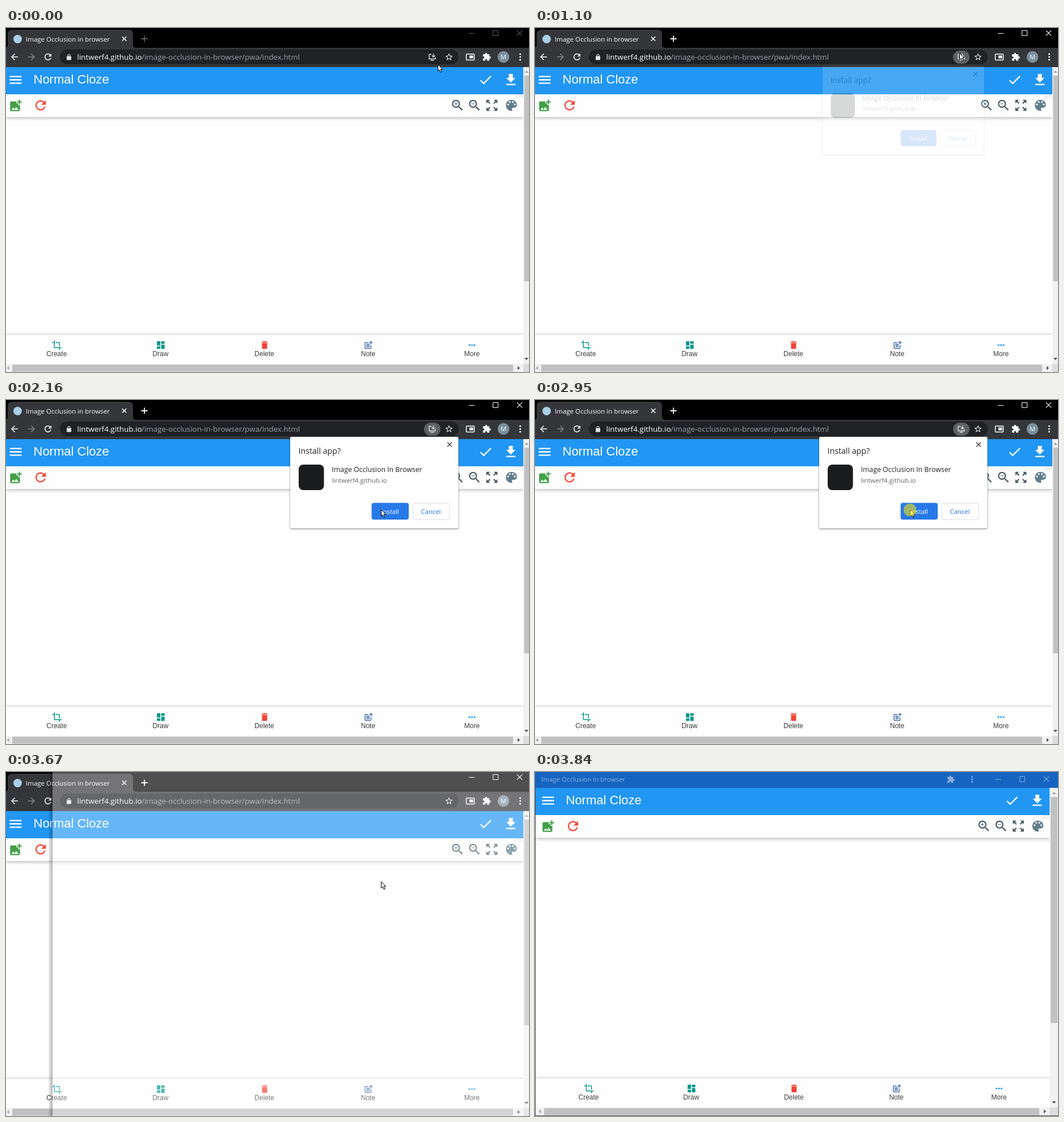
An HTML page for the animation above (4.51 s loop, 922 by 607 pixels).

```html
<!DOCTYPE html>
<html lang="en">
<head>
<meta charset="utf-8">
<title>Installing a web app</title>
<style>
  html, body { margin: 0; width: 100%; height: 100%; overflow: hidden; background: #000; }
  svg { display: block; width: 100vw; height: 100vh; }
  text { font-family: "Open Sans", "Noto Sans CJK SC", "Noto Sans CJK", sans-serif; white-space: pre; }
  .arial { font-family: "Liberation Sans", Arial, sans-serif; }
  .mid { text-anchor: middle; }
  .below { filter: drop-shadow(0 2px 3px #0004); }
  .above { filter: drop-shadow(0 -1px 2px #0003); }
  .card { filter: drop-shadow(0 1px 1.5px #0008); }
</style>
</head>
<body>
<svg id="stage" viewBox="0 0 922 607"></svg>
<script>
const LOOP = 4510;
const BLUE = '#2196f3', CHROME = '#35363a', SLATE = '#455a64', GREY = '#9aa0a6';
const HOST = 'lintwerf4.github.io';

// Icon outlines on a 24 unit grid
const lens = 'M15.5 14h-.79l-.28-.27C15.41 12.59 16 11.11 16 9.5 16 5.91 13.09 3 9.5 3S3 5.91 3 9.5 5.91 16 9.5 16c1.61 0 3.09-.59 4.23-1.57l.27.28v.79l5 4.99L20.49 19zm-6 0C7.01 14 5 11.99 5 9.5S7.01 5 9.5 5 14 7.01 14 9.5 11.99 14 9.5 14z';
const ICONS = {
  menu: 'M3 18h18v-2H3zm0-5h18v-2H3zm0-7v2h18V6z',
  check: 'M9 16.17L4.83 12l-1.42 1.41L9 19 21 7l-1.41-1.41z',
  download: 'M19 9h-4V3H9v6H5l7 7zM5 18v2h14v-2z',
  addImage: 'M19 7v3h-2V7h-3V5h3V2h2v3h3v2zm-3 4V8h-3V5H5c-1.1 0-2 .9-2 2v12c0 1.1.9 2 2 2h12c1.1 0 2-.9 2-2v-8zM5 19l3-4 2 3 3-4 4 5z',
  refresh: 'M17.65 6.35C16.2 4.9 14.21 4 12 4c-4.42 0-7.99 3.58-7.99 8s3.57 8 7.99 8c3.73 0 6.84-2.55 7.73-6h-2.08c-.82 2.33-3.04 4-5.65 4-3.31 0-6-2.69-6-6s2.69-6 6-6c1.66 0 3.14.69 4.22 1.78L13 11h7V4z',
  zoomIn: lens + 'M12 10h-2v2H9v-2H7V9h2V7h1v2h2z',
  zoomOut: lens + 'M7 9h5v1H7z',
  expand: 'M15 3l2.3 2.3-2.89 2.87 1.42 1.42L18.7 6.7 21 9V3zM3 9l2.3-2.3 2.87 2.89 1.42-1.42L6.7 5.3 9 3H3zM9 21l-2.3-2.3 2.89-2.87-1.42-1.42L5.3 17.3 3 15v6zM21 15l-2.3 2.3-2.87-2.89-1.42 1.42 2.89 2.87L15 21h6z',
  palette: 'M12 3c-4.97 0-9 4.03-9 9s4.03 9 9 9c.83 0 1.5-.67 1.5-1.5 0-.39-.15-.74-.39-1.01-.23-.26-.38-.61-.38-.99 0-.83.67-1.5 1.5-1.5H16c2.76 0 5-2.24 5-5 0-4.42-4.03-8-9-8zm-5.5 9a1.5 1.5 0 1 1 0-3 1.5 1.5 0 0 1 0 3zm3-4a1.5 1.5 0 1 1 0-3 1.5 1.5 0 0 1 0 3zm5 0a1.5 1.5 0 1 1 0-3 1.5 1.5 0 0 1 0 3zm3 4a1.5 1.5 0 1 1 0-3 1.5 1.5 0 0 1 0 3z',
  crop: 'M17 15h2V7c0-1.1-.9-2-2-2H9v2h8zM7 17V1H5v4H1v2h4v10c0 1.1.9 2 2 2h10v4h2v-4h4v-2z',
  dashboard: 'M3 13h8V3H3zm0 8h8v-6H3zm10 0h8V11h-8zm0-18v6h8V3z',
  trash: 'M6 19c0 1.1.9 2 2 2h8c1.1 0 2-.9 2-2V7H6zM19 4h-3.5l-1-1h-5l-1 1H5v2h14z',
  note: 'M17 19H5V7h7V5H5c-1.1 0-2 .9-2 2v12c0 1.1.9 2 2 2h12c1.1 0 2-.9 2-2v-7h-2zM19 2h-2v3h-3v2h3v3h2V7h3V5h-3zM7 9h8v2H7zm0 3h8v2H7zm0 3h8v2H7z',
  puzzle: 'M20.5 11H19V7c0-1.1-.9-2-2-2h-4V3.5a2.5 2.5 0 0 0-5 0V5H4c-1.1 0-2 .9-2 2v3.8h1.5a2.7 2.7 0 0 1 0 5.4H2V20c0 1.1.9 2 2 2h3.8v-1.5a2.7 2.7 0 0 1 5.4 0V22H17c1.1 0 2-.9 2-2v-4h1.5a2.5 2.5 0 0 0 0-5z',
  star: 'M22 9.24l-7.19-.62L12 2 9.19 8.63 2 9.24l5.46 4.73L5.82 21 12 17.27 18.18 21l-1.63-7.03zM12 15.4l-3.76 2.27 1-4.28-3.32-2.88 4.38-.38L12 6.1l1.71 4.04 4.38.38-3.32 2.88 1 4.28z',
  lock: 'M18 8h-1V6A5 5 0 0 0 7 6v2H6c-1.1 0-2 .9-2 2v10c0 1.1.9 2 2 2h12c1.1 0 2-.9 2-2V10c0-1.1-.9-2-2-2zm-3 0H9V6a3 3 0 0 1 6 0z',
  back: 'M20 11H7.83l5.59-5.59L12 4l-8 8 8 8 1.41-1.41L7.83 13H20z',
  forward: 'M12 4l-1.41 1.41L16.17 11H4v2h12.17l-5.58 5.59L12 20l8-8z'
};

const rect = (x, y, w, h, fill, extra = '') =>
  `<rect x="${x}" y="${y}" width="${w}" height="${h}" fill="${fill}" ${extra}/>`;
const circle = (x, y, r, fill) => `<circle cx="${x}" cy="${y}" r="${r}" fill="${fill}"/>`;
const text = (x, y, size, fill, str, cls = '') =>
  `<text x="${x}" y="${y}" font-size="${size}" fill="${fill}" class="${cls}">${str}</text>`;
const line = (d, color, width = 1) =>
  `<path d="${d}" fill="none" stroke="${color}" stroke-width="${width}"/>`;
const icon = (name, x, y, size, fill) =>
  `<path d="${ICONS[name]}" fill="${fill}" transform="translate(${x - size / 2} ${y - size / 2}) scale(${size / 24})"/>`;
const dots = (x, y, dx, dy, r, fill) =>
  [-1, 0, 1].map(i => circle(x + i * dx, y + i * dy, r, fill)).join('');
const cross = (x, y, r, color, width) =>
  line(`M${x - r} ${y - r}l${2 * r} ${2 * r}m0 ${-2 * r}l${-2 * r} ${2 * r}`, color, width);
const group = (id, content, extra = '') => `<g id="${id}" ${extra}>${content}</g>`;
const arrow = (x, y, turn, fill) =>
  `<path d="M-3.5 2L0 -2 3.5 2z" fill="${fill}" transform="translate(${x} ${y}) rotate(${turn})"/>`;
const edge = x => rect(x - 8, 0, 8, 607, 'url(#edge)');

const windowButtons = (x, y, color) =>
  line(`M${x - 5} ${y + .5}h10M${x + 37.5} ${y - 4.5}h9v9h-9z`, color) + cross(x + 84.5, y, 4.7, color, 1.1);

// left / right: shift of the icons tied to either side
function app({ x0, x1, y, left, right, footer, labels }) {
  const w = x1 - x0, bar = y + 22.5, tools = y + 67.5;
  const tabs = [['Create', 'crop', '#009688'], ['Draw', 'dashboard', '#009688'],
    ['Delete', 'trash', '#f44336'], ['Note', 'note', '#4a6fa5'], ['More', '', BLUE]];
  return rect(x0, y, w, 607 - y, '#fefefe') +
    rect(x0, y + 48, w, 40, '#fefefe', 'class="below"') + rect(x0, y, w, 48, BLUE) +
    rect(x1 - 14, y + 48, 14, 7, '#f1f1f1') +
    icon('menu', left + 17, bar, 28, '#fff') +
    text(left + 48.5, y + 29.3, 22, '#fff', 'Normal Cloze', 'arial') +
    icon('check', right + 845.5, bar, 27, '#fff') + icon('download', right + 890, bar, 28, '#fff') +
    icon('addImage', left + 17, tools + .5, 26, '#43a047') + icon('refresh', left + 61, tools, 27, '#f44336') +
    icon('zoomIn', right + 796, tools, 26, SLATE) + icon('zoomOut', right + 826, tools, 26, SLATE) +
    icon('expand', right + 856.5, tools, 26, SLATE) + icon('palette', right + 891, tools, 26, '#607d8b') +
    (footer ? rect(x0, footer, w, 52, '#fefefe', 'class="above"') + tabs.map(([name, glyph, color], i) => {
      const x = labels[0] + (labels[1] - labels[0]) * i / 4;
      return (glyph ? icon(glyph, x + .5, footer + 18, 18, color) : dots(x, footer + 18, 4.5, 0, 1.6, color)) +
        text(x, footer + 37.5, 12, '#3c3c3c', name, 'arial mid');
    }).join('') : '');
}

function scrollbars(x, y, top, thumb, bottom, hThumb) {
  const cx = Math.min(x + 7.5, 917.5);
  return rect(x, y, 15, 607 - y, '#f1f1f1') + rect(x + 1.5, thumb[0], 12, thumb[1] - thumb[0], '#c1c1c1') +
    rect(0, bottom, x, 15, '#f1f1f1') + rect(x, bottom, 15, 15, '#dcdcdc') +
    rect(hThumb[0], bottom + 1, hThumb[1] - hThumb[0], 12.5, '#c1c1c1') +
    arrow(cx, top, 0, '#a3a3a3') + arrow(cx, bottom - 9, 180, '#505050') +
    arrow(hThumb[0] - 7.5, bottom + 7, -90, '#a3a3a3') + arrow(hThumb[1] + 10, bottom + 7, 90, '#505050');
}

const frame = (tabX, title, titleX) =>
  rect(0, 0, 922, 607, '#000') + rect(0, 35, 922, 34, CHROME) +
  `<path d="M${tabX - 6} 35q6 0 6-6V11q0-8 8-8H216q8 0 8 8v18q0 6 6 6z" fill="${CHROME}"/>` +
  text(titleX, 24, 11.5, '#fff', title) + cross(208.5, 19, 3.7, '#fff', 1.5) +
  rect(95, 38, 703, 26, '#202124', 'rx="13"') +
  icon('star', 781, 51, 16, '#e8eaed') +
  rect(811.5, 46, 14, 10.5, 'none', 'stroke="#fff" stroke-width="1.5" rx="1"') + rect(817, 48.5, 6.5, 5, '#fff') +
  icon('puzzle', 847.5, 51, 16, '#fff') +
  circle(877, 51, 10.3, '#78909c') + text(877, 55, 11, '#fff', 'M', 'mid') +
  dots(906.5, 51, 0, 5, 1.5, '#fff');
const plus = line('M238.5 19h11M244 13.5v11', '#fff', 1.8);

const browser = frame(3, 'Image Occlusion in browser', 35) + circle(20.5, 19.5, 7.5, '#a9cfe8') +
  icon('back', 15, 51, 18, '#fff') + icon('forward', 45, 51, 18, '#85878a') + icon('refresh', 74, 51, 18, '#fff') +
  icon('lock', 111, 51.5, 12, '#dfe1e5') + text(125.5, 56, 13.4, '#fff', HOST) +
  text(239, 56, 13.4, GREY, '/image-occlusion-in-browser/pwa/index.html') +
  group('install', rect(737, 40, 29, 23, '#5f6063', 'rx="11.5" id="pill"') +
    line('M750 46.5h-4v8h11v-3M748.5 57h6M753.5 45v6M750.8 48.5l2.7 2.7 2.7-2.7', '#dfe1e5', 1.4)) +
  group('controls', plus + windowButtons(821, 9, '#fff')) +
  app({ x0: 0, x1: 912, y: 69, left: 0, right: 0, footer: 541.5, labels: [89.3, 821.5] }) +
  scrollbars(912, 69, 77, [84, 447], 593, [11, 894]);

const dialog = rect(501, 65, 296.5, 161.5, '#fff', 'rx="2" class="card"') +
  cross(782, 78.5, 4, '#444', 1.5) + text(515.5, 95, 14.2, '#202124', 'Install app?') +
  rect(516, 114, 44.5, 45, '#1b1c1e', 'rx="8"') +
  text(574.5, 127, 12.3, '#202124', 'Image Occlusion In Browser') + text(574.5, 145.5, 11.4, '#5f6368', HOST) +
  rect(644.5, 181.5, 65.5, 29.5, '#1a73e8', 'rx="4" id="confirm"') + text(677, 201, 11.3, '#fff', 'Install', 'mid') +
  rect(717, 182, 65, 29, '#fff', 'rx="4" stroke="#dadce0"') + text(749, 201, 11.3, '#1a73e8', 'Cancel', 'mid');

const FOLDER = '#f8dc8c';
const bookmarks = [[94, 'Telmi', '#fff', 1], [163, 'Vuzmelo', '#e53935'], [248, 'Ways', '#5fae6b', 1],
  [314, 'News', '#5b93e8'], [380, 'Watch Later', FOLDER], [481, 'Learn', FOLDER], [547, 'Tools', FOLDER],
  [613, '砾溪学园VOMD(课...', '#4d9fd0'], [754.5, '岚溪院温砚禾的个...', '#35a9e0']];
const appsGrid = ['#ea5b4f', '#f2a93b', '#58a55c'].map((color, row) =>
  [0, 1, 2].map(col => rect(10 + col * 4.5, 76 + row * 4.5, 3, 3, color)).join('')).join('');

const newTab = frame(9, 'New Tab', 20) + plus + windowButtons(821, 9, '#666') +
  rect(0, 69, 922, 28, CHROME) + rect(0, 97, 922, 510, '#323232') + rect(0, 97, 922, 1, '#242527') +
  icon('back', 15, 51, 18, '#a5a7aa') + icon('forward', 45, 51, 18, '#a5a7aa') + cross(74, 51, 4.8, '#fff', 1.8) +
  circle(111.5, 51.5, 7.5, '#fff') + text(125.5, 56, 13.4, GREY, 'Search Plinor or type a URL') +
  appsGrid + text(30, 86, 11.5, '#fff', 'Apps') +
  bookmarks.map(([x, name, color, round]) =>
    (round ? circle(x - 14, 81.5, 7, color) : rect(x - 20, 75.5, 12, 12, color, 'rx="1"')) +
    text(x, 86, 11.5, '#fff', name)).join('') + text(902, 85, 12, '#fff', '»') +
  edge(74) + `<g opacity=".67">${app({ x0: 74, x1: 936, y: -7, left: 78.5, right: 92.5 })}</g>`;

const FADED = '#8aaede';
const installed = rect(0, 0, 922, 607, '#fff') + rect(0, 0, 922, 28, '#1565c0') +
  text(11, 17.3, 11.5, FADED, 'Image Occlusion in browser') + icon('puzzle', 733, 13, 15, FADED) +
  dots(770.5, 13, 0, 4.5, 1.4, FADED) + windowButtons(817, 12.5, FADED) +
  app({ x0: 0, x1: 907.5, y: 28, left: 6, right: -4.5, footer: 540.5, labels: [94.5, 818] }) +
  scrollbars(907.5, 28, 37, [44, 443], 592, [16, 889]) + line('M.5 28V606.5H922', '#4a4a4a');

document.getElementById('stage').innerHTML =
  '<defs><linearGradient id="edge"><stop stop-opacity="0"/><stop offset="1" stop-opacity=".3"/></linearGradient></defs>' +
  group('browser', browser) + group('dialog', dialog) +
  group('veil', edge(82) + rect(82, 0, 840, 607, '#fff', 'opacity=".31"')) +
  group('newTab', newTab) + group('installed', installed) +
  group('cursor', '<path d="M0 0V11.5L2.7 9 4.6 13.6 6.6 12.8 4.7 8.3H8.3z" fill="#fff" stroke="#000"/>') +
  group('click', circle(661, 194, 11.3, '#ffeb00'));

const $ = id => document.getElementById(id);
const show = (id, on) => $(id).style.display = on ? '' : 'none';
const fade = (id, amount) => { show(id, amount > 0); $(id).style.opacity = amount; };
const mix = (a, b, p) => a + (b - a) * p;
const smooth = p => p * p * (3 - 2 * p);

// Progress in n equal jumps, the first at time a and the last at time b
const jumps = (t, a, b, n) =>
  t < a ? 0 : Math.min(1, (Math.floor((t - a) / (b - a) * (n - 1) + 1e-6) + 1) / n);

function draw() {
  const t = performance.now() % LOOP;
  const toIcon = jumps(t, 80, 230, 3), toButton = smooth(jumps(t, 1640, 2160, 8));
  const active = jumps(t, 550, 780, 4), open = jumps(t, 1100, 1320, 4);
  const press = jumps(t, 2950, 3180, 4);
  const remain = Math.min(1, (1 - press) / .75);

  fade('controls', mix(.36, 1, active));
  fade('pill', active);
  fade('install', 1 - jumps(t, 3350, 3410, 2));

  fade('dialog', open ** 1.3 * remain);
  const size = open < 1 ? mix(.947, 1, open) : 1;
  $('dialog').setAttribute('transform', `translate(649 146) scale(${size}) translate(-649 -146)`);
  $('confirm').setAttribute('fill', toButton > .85 ? '#2779e8' : '#1a73e8');
  fade('click', press ? .55 * remain : 0);

  const x = mix(mix(761.5, 748.5, toIcon), 661.5, toButton);
  const y = mix(mix(64.5, 44.5, toIcon), 193.5, toButton);
  $('cursor').setAttribute('transform', `translate(${x} ${y})`);

  show('browser', t < 3740);
  show('veil', t >= 3670 && t < 3740);
  show('newTab', t >= 3740 && t < 3840);
  show('installed', t >= 3840);
  show('cursor', t < 3840);
  requestAnimationFrame(draw);
}
draw();
</script>
</body>
</html>
```
